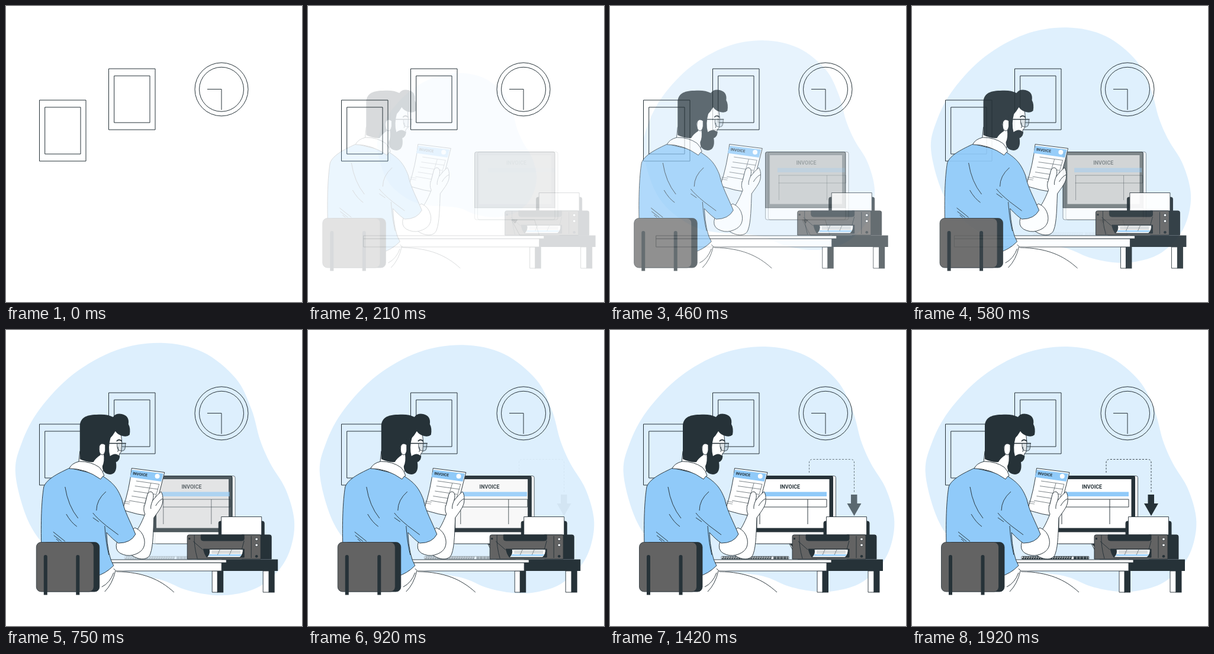
An HTML page with a canvas for the animation above (2000 ms loop, 500 by 500 pixels).

```html
<!DOCTYPE html>
<html lang="en">
<head>
<meta charset="utf-8">
<title>Invoice desk</title>
<style>
html, body { margin: 0; width: 100%; height: 100%; overflow: hidden; background: #fff; }
canvas { display: block; width: 500px; height: 500px; }
</style>
</head>
<body>
<canvas id="stage" width="500" height="500"></canvas>
<script>
const main = document.getElementById('stage').getContext('2d');
const buffer = document.createElement('canvas');
buffer.width = buffer.height = 500;
const sheetCtx = buffer.getContext('2d');
let ctx = main;

const INK = '#263238', BLUE = '#90caf9', PALE = '#ddeffd', GREY = '#636363', WHITE = '#fff';
const LOOP = 2000;
const paths = new Map();

const clamp = v => Math.max(0, Math.min(1, v));
const smooth = v => { v = clamp(v); return v * v * (3 - 2 * v); };

function bezier(x1, y1, x2, y2) {
  const at = (a, b, s) => 3 * a * s * (1 - s) ** 2 + 3 * b * s * s * (1 - s) + s ** 3;
  return x => {
    if (x <= 0) return 0;
    if (x >= 1) return 1;
    let lo = 0, hi = 1;
    for (let i = 0; i < 24; i++) {
      const mid = (lo + hi) / 2;
      if (at(x1, x2, mid) < x) lo = mid; else hi = mid;
    }
    return at(y1, y2, lo);
  };
}
const swing = bezier(.36, -.01, .5, 1.38);
const easeOut = bezier(0, 0, .58, 1);

function path(d) {
  if (!paths.has(d)) paths.set(d, new Path2D(d));
  return paths.get(d);
}
function shape(d, fill, line = .95) {
  const p = path(d);
  if (fill) { ctx.fillStyle = fill; ctx.fill(p); }
  if (line) { ctx.strokeStyle = INK; ctx.lineWidth = line; ctx.stroke(p); }
}
const stroke = (d, width = .95) => shape(d, null, width);
function box(x, y, x2, y2, fill, line = .9, r = 0) {
  ctx.beginPath();
  ctx.roundRect(x, y, x2 - x, y2 - y, r);
  if (fill) { ctx.fillStyle = fill; ctx.fill(); }
  if (line) { ctx.strokeStyle = INK; ctx.lineWidth = line; ctx.stroke(); }
}
function disc(x, y, r, fill, line = 0) {
  ctx.beginPath();
  ctx.arc(x, y, r, 0, Math.PI * 2);
  if (fill) { ctx.fillStyle = fill; ctx.fill(); }
  if (line) { ctx.strokeStyle = INK; ctx.lineWidth = line; ctx.stroke(); }
}

// Every piece fades on its own
function layer(dx, alpha, draw) {
  if (alpha <= 0) return;
  ctx.save();
  ctx.translate(dx, 0);
  ctx.globalAlpha = clamp(alpha);
  draw();
  ctx.restore();
}
// The pieces are merged first, then fade as one
function group(dx, alpha, draw) {
  if (alpha <= 0) return;
  ctx = sheetCtx;
  ctx.clearRect(0, 0, 500, 500);
  ctx.lineJoin = 'round';
  layer(dx, 1, draw);
  ctx = main;
  layer(0, alpha, () => ctx.drawImage(buffer, 0, 0));
}

function title(x, y, size, room) {
  const face = s => `bold condensed ${s}px Roboto, "Open Sans", sans-serif`;
  ctx.font = face(size);
  const w = ctx.measureText('INVOICE').width;
  if (w > room) ctx.font = face(size * room / w);
  ctx.fillStyle = INK;
  ctx.textAlign = 'center';
  ctx.textBaseline = 'middle';
  ctx.fillText('INVOICE', x, y);
}

const rim = [[23, 245], [33, 192], [63, 136], [118, 79], [188, 40], [262, 28], [330, 43],
  [384, 86], [410, 137], [424, 187], [441, 226], [466, 268], [480, 318], [475, 362],
  [457, 398], [424, 427], [384, 440], [345, 441.5], [302, 433], [250, 414], [147, 404],
  [86, 373], [46, 325]];

function blob(scale) {
  ctx.translate(251.5, 235);
  ctx.scale(scale, scale);
  ctx.translate(-251.5, -235);
  const n = rim.length, at = i => rim[(i + n) % n];
  ctx.beginPath();
  ctx.moveTo(...rim[0]);
  for (let i = 0; i < n; i++) {
    const [a, b, c, d] = [at(i - 1), at(i), at(i + 1), at(i + 2)];
    ctx.bezierCurveTo(b[0] + (c[0] - a[0]) / 6, b[1] + (c[1] - a[1]) / 6,
      c[0] - (d[0] - b[0]) / 6, c[1] - (d[1] - b[1]) / 6, ...c);
  }
  ctx.fillStyle = PALE;
  ctx.fill();
}

function wall() {
  for (const [x, y] of [[56.5, 159], [173.5, 106]]) {
    box(x, y, x + 78.5, y + 103, null, 1);
    box(x + 9.2, y + 12, x + 69.5, y + 91, null, 1);
  }
  disc(364, 140.8, 45, null, 1);
  disc(364, 140.8, 37.5, null, 1);
  stroke('M340 140.6H364V175.5', 1);
}

function monitorCase() {
  shape('M303 361H342L350 387H317Z', WHITE);
  shape('M304 361L309 367L313 361Z', INK);
  box(246, 246.5, 381.5, 361, WHITE, .8, 3);
  box(241, 246.5, 376.5, 361, WHITE, .8, 3);
  shape('M241 341V249Q241 246.5 244 246.5H374Q376.5 246.5 376.5 249V341Z', INK);
  ctx.globalAlpha **= .8;
  box(248.5, 252, 370.5, 334.5, WHITE, 0);
}
function screenGrid() {
  stroke('M252 286H366M252 299H366M253 286V328M334 286V328M366 286V299');
}

function desk() {
  box(350, 407, 360, 443, WHITE);
  box(436, 407, 446, 443, WHITE);
  box(358.5, 393, 369, 443.5, INK, 0);
  box(445.5, 393, 455.5, 443.5, INK, 0);
  box(366, 387.5, 461, 407, INK, 0);
  box(69, 393, 366, 407, WHITE);
  box(69, 388, 374, 393, WHITE);
}

function printer() {
  shape('M361 347V326Q361 323 364 323H367V347ZM433 323H435Q438 323 438 326V347H433Z', INK);
  box(365.5, 315.5, 433.5, 348, WHITE);
  shape('M400 346H447Q450 346 450 349V387H400Z', INK);
  shape('M311 346H430Q432 346 432 348V387H308V349Q308 346 311 346Z', GREY);
  shape('M331 346H404V353Q404 356 400 356H335Q331 356 331 352Z', INK);
  stroke('M320 346Q319 365 325 386M318 357L334 371M404 356L400 371M416 348V385');
  box(310, 351, 313, 354, INK, 0);
  shape('M335 370H404V384H341Q337 379 335 370Z', INK);
  shape('M345 370.5H402Q403 378 397 384H341Q347 378 345 370.5Z', WHITE);
  shape('M345.5 379H399.5L398 381.5H344Z', BLUE, 0);
  stroke('M349 373.5H398M349 376.5H398M363 371L359 380M383 371L379 380', .5);
  disc(425, 353.3, 2.3, WHITE, .8);
  disc(425, 363.3, 2.3, WHITE, .8);
  disc(425, 382.3, 2.3, INK);
}

function keyboard() {
  box(185, 382.3, 299, 387.3, WHITE, .7, 1);
  ctx.save();
  ctx.setLineDash([3.4, .6]);
  stroke('M187 383.7H270M186 386H270', 1.8);
  ctx.setLineDash([5, .6]);
  stroke('M273 383.7H298M273 386H298', 2);
  ctx.restore();
}

function arrow() {
  ctx.save();
  ctx.setLineDash([3, 2.4]);
  stroke('M328 241V224Q328 218.5 334 218.5H398Q404 218.5 404 224V275', .9);
  ctx.restore();
  shape('M398.5 278H409V293H416L404 314L392 293H398.5Z', INK, 0);
}

function sheet() {
  shape('M210.5 233.5L266 240.5Q258 278 244 315Q220 312 195 304Q207 268 210.5 233.5Z', WHITE);
  shape('M211 236L264 242.5L260.5 256L207.5 248.5Z', BLUE, 0);
  disc(253.8, 247, 4, WHITE);
  ctx.save();
  ctx.translate(224.8, 244);
  ctx.rotate(.13);
  title(0, 0, 10, 25);
  ctx.restore();
  stroke('M218 255L257 260.5L247 295L206 288M216 263.5L255 269M213.5 272L251 277.5M210.5 280.5L246 286M243 259L233 293', .6);
  stroke('M197 289L208 291M196 292L207 294M230 297L237 298', .5);
}

function legs() {
  shape('M155 415L181 401L185 407C230 408 258 420 283 443H155Z', WHITE, 0);
  stroke('M180 403L185 408C230 409 258 421 282 443M183 407Q178 429 165 442M180 410Q174 427 160 434');
}

function arm() {
  shape('M233 311C227 326 222 336 214 345L205 376C218 389 238 391 242 378C247 365 247 338 248 317'
    + 'C256 306 263 297 263 289Q264 278 260 273Q254 278 246 288Q249 278 245 274Q240 271 237 278L233 294Q229 303 233 311Z', WHITE);
  stroke('M246 288Q242 297 243 302M263 285Q257 287 251 297');
  shape('M186 357Q181 371 191 377Q202 383 213 380Q235 374 232 354Q229 339 216 334Z', WHITE);
}

function torso() {
  shape('M106 233C89 241 67 251 62 265C58 290 57 325 58 366L150 416Q166 412 180 398'
    + 'Q170 382 168 342Q180 355 188 360Q209 360 217 345C208 323 198 306 194 286C187 268 180 258 160 246Z', BLUE);
  stroke('M98 265Q103 297 120 318M100 311Q108 325 118 332M167 273Q151 287 151 305M145 309Q151 317 168 331'
    + 'L188 346M145 317L155 324M165 331Q167 361 172 380M78 341L98 357M83 353L88 357M79 347L92 357');
}

function head() {
  shape('M123 205L121 224Q145 228 161 242L168 222L186 222L190 214Q188 209 193 206L194 190L192 170L150 165Z', WHITE);
  shape('M122 222Q109 225 105 234Q133 234 158 252Q162 246 164 246Q162 238 156 232Q142 222 122 222Z', WHITE);
  shape('M123 218V163C123 149 133 143 151 143C163 142 172 143 179 147Q184 140 194 142Q207 145 205 159'
    + 'Q209 166 207 177Q203 181 195 179Q187 177 183 171Q179 178 174 183L170 196Q156 188 155 200L158 211'
    + 'Q149 217 146 223Q135 224 123 218Z', INK, 0);
  shape('M165 192Q164 183 169 181L175 181Q170 199 174 213Q183 206 190 213Q191 220 184 223'
    + 'Q187 243 174 244Q161 243 161 230Q165 222 163 208Z', INK, 0);
  shape('M166 194Q159 189 156 196Q154 210 161 211Q165 210 166 203Z', WHITE);
  stroke('M185 188Q189 183 194 188', 1.8);
  stroke('M187 197Q189 202 187 206');
  stroke('M165 191.5H201', 1.5);
  layer(0, .25, () => box(186, 192, 200, 204, '#78909c', 0, 4));
  stroke('M186 192Q185 203 191 204H196Q200 203 200 192', .8);
}

function chair() {
  box(60, 358.5, 156, 442, INK, .8, 8);
  box(49.5, 358.5, 146.5, 442, GREY, .8, 8);
  for (const x of [62, 116.5]) box(x, 380, x + 6, 447.5, INK, 0, [3, 3, 0, 0]);
}

function draw(ms) {
  const t = ms / 1000;
  ctx.clearRect(0, 0, 500, 500);
  ctx.lineJoin = 'round';

  const p = swing(t * 1.045);
  layer(0, p, () => blob(.5 + .5 * p));
  wall();

  const screenPart = (delay, part) =>
    layer(60 * (1 - easeOut(t - delay)), smooth((t - delay) / 1.05), part);
  screenPart(0, monitorCase);
  screenPart(.13, () => box(252, 273.5, 366, 281, BLUE, 0));
  screenPart(.085, () => title(304, 265.5, 12.5, 34));
  screenPart(.15, screenGrid);

  const side = 30 * (1 - p);
  group(side, p, desk);
  const k = easeOut((t - .55) / 1.3);
  layer(20 * (1 - k), k, keyboard);
  group(side, p, printer);
  group(-side, p, () => {
    legs(); sheet(); arm(); torso(); head(); chair();
  });

  const a = easeOut(t - .89);
  layer(30 * (1 - a), a, arrow);
}

const start = performance.now();
function tick(now) {
  draw(Math.max(0, now - start) % LOOP);
  requestAnimationFrame(tick);
}
draw(0);
requestAnimationFrame(tick);
</script>
</body>
</html>
```
